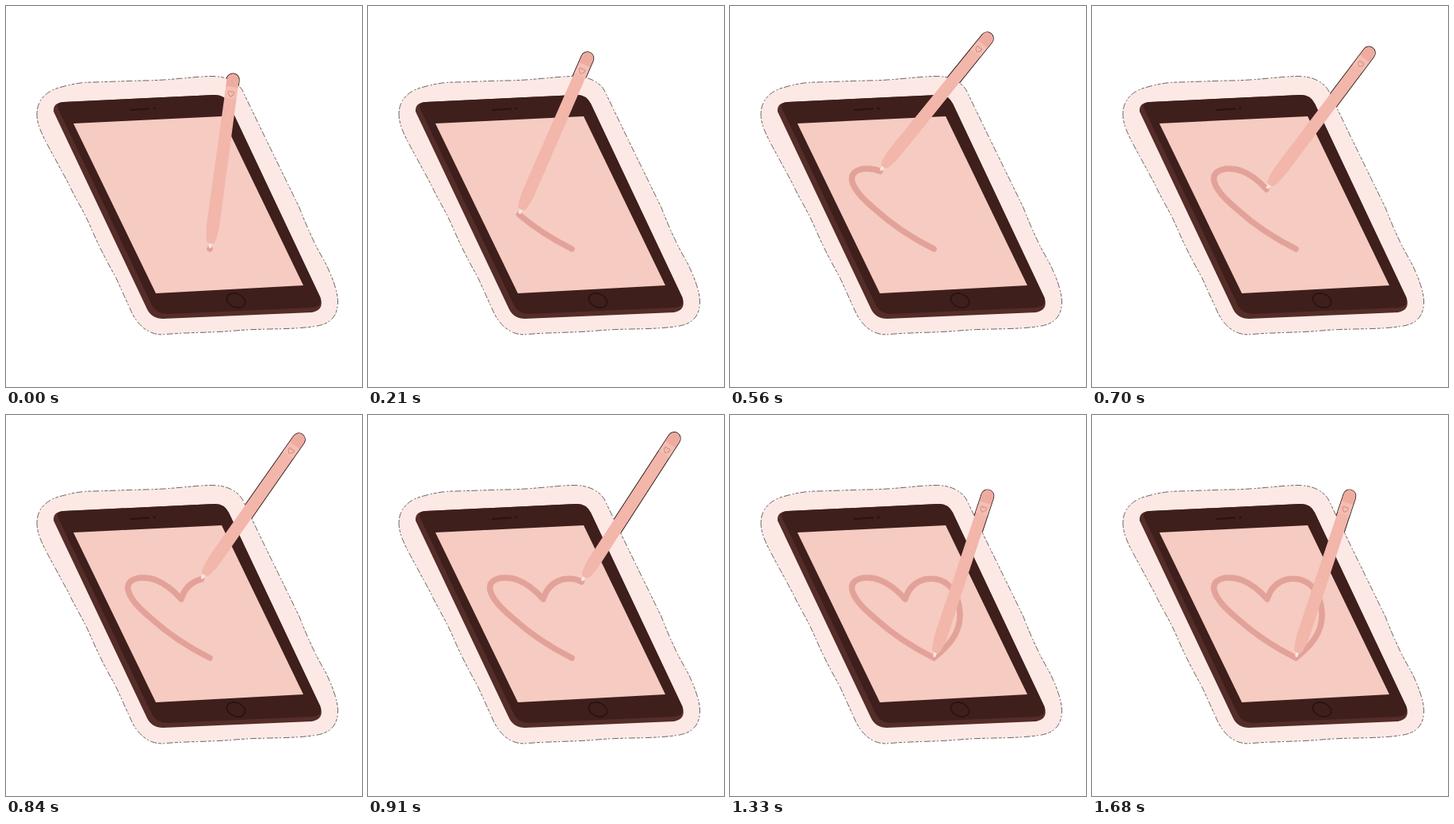
Write an HTML page that moves like this. It is 449x480 px and loops after 1.75 s.

```html
<!DOCTYPE html>
<html lang="en">
<head>
<meta charset="utf-8">
<title>Drawing a heart</title>
<style>
html, body { margin: 0; width: 100%; height: 100%; overflow: hidden; background: #fff; }
svg { display: block; width: 100vw; height: 100vh; }
</style>
</head>
<body>
<svg viewBox="0 0 449 480">
  <defs>
    <path id="body" d="M-4.5,-8 C-7,-14 -8,-24 -8,-34 L-7.6,-215 A7.6,7.6 0 0 1 7.6,-215 L8,-34 C8,-24 7,-14 4.5,-8 Q0,-5 -4.5,-8 Z"/>
  </defs>

  <!-- only shows where the pen leaves the sticker -->
  <g class="pen"><use href="#body" fill="none" stroke="#2b1a18" stroke-width="1.9"/></g>

  <path fill="#fce9e5" stroke="#4a4240" stroke-width=".8" stroke-dasharray="4 2 8 3 2 2" d="M39,136
    C39,120 49,107 70,102 C85,98 95,96 110,96 L170,94 C205,94 235,89 258,88.500
    C277,88 291,95 298,106 L326,164 L370,254 C380,280 391,304 402,322
    C411,340 419,360 418.500,374 C418,392 408,401 390,403.500 C360,408 330,406 295,408.500
    C260,412 225,411 197,414 C180,414 167,403 159,387 L139,343
    C127,321 118,305 107,279 C97,256 87,242 79,224 L54,178 C46,163 39,150 39,136 Z"/>

  <path fill="#542c28" d="M60,133 Q59,122 72,121 L262,112 Q275,111 281,123 L397,369 Q401,383 386,386 L198,394 Q184,394 178,382 Z"/>
  <path fill="#3e1f1c" d="M66,130 Q62,121.500 73,121 L262,112 Q275,111 281,123 L396.500,367 Q400,379 386,380 L203,388 Q190,388 184,377 Z"/>
  <path fill="#f6cbc1" d="M85,148 L272,139 L375,352 L189,362 Z"/>
  <g fill="none" stroke="#2a1211" stroke-linecap="round">
    <path stroke-width="2" d="M157,131 L180,129.500"/>
    <path stroke-width="3" d="M187,129 h.1"/>
    <ellipse cx="290" cy="371" rx="12" ry="8.500" stroke-width="1.6" transform="rotate(22 290 371)"/>
  </g>

  <path id="trail" fill="none" stroke="#e3a299" stroke-width="7.500" stroke-linecap="round" stroke-linejoin="round"/>

  <g class="pen">
    <path d="M-2.200,-9 L-1.600,-2 Q0,0 1.600,-2 L2.200,-9 Z" fill="#fce6e1"/>
    <use href="#body" fill="#f2b6aa"/>
    <path d="M-7.600,-206 L-7.600,-215 A7.600,7.600 0 0 1 7.600,-215 L7.600,-206 Z" fill="#eeaca0"/>
    <path d="M-7.600,-206 H7.600 V-191 H-7.600 Z" fill="#f4beb3"/>
    <path d="M0,-193.500 C-6,-198 -3.500,-202.500 0,-199.500 C3.500,-202.500 6,-198 0,-193.500 Z" fill="none" stroke="#d9948b" stroke-width="1.2"/>
  </g>
</svg>
<script>
const LOOP = 1750, STEP = 70;

// each stretch of the heart: end time, path commands
const parts = [
  [350, "C231,293 206,277 184,257 C171,246 160,236 155,224"],
  [560, "C150,211 160,205 173,205 Q182,205 189,208"],
  [840, "Q205,214 221,232 Q227,212 246,207"],
  [1050, "C268,203 288,216 290,250"],
  [1260, "C291,274 276,291 257,306"]
];
// time, tilt of the pen in degrees
const tilts = [[0, 7.8], [350, 34.2], [560, 39], [840, 35], [910, 33], [980, 27], [1050, 18.5], [1260, 18.4]];

const trail = document.getElementById("trail");
const pens = document.querySelectorAll(".pen");

let d = "M257,306";
const travel = [[0, 0]];
for (const [time, cmd] of parts) {
  d += " " + cmd;
  trail.setAttribute("d", d);
  travel.push([time, trail.getTotalLength()]);
}
const total = trail.getTotalLength();

function lerpKeys(keys, t) {
  const i = keys.findIndex(k => k[0] > t);
  if (i < 0) return keys[keys.length - 1][1];
  const [t0, a] = keys[i - 1], [t1, b] = keys[i];
  return a + (b - a) * (t - t0) / (t1 - t0);
}

function draw(now) {
  const t = Math.floor((now % LOOP) / STEP) * STEP;
  const len = lerpKeys(travel, t);
  const tip = trail.getPointAtLength(len);
  trail.setAttribute("stroke-dasharray", `${Math.max(len, 0.01)} ${total + 20}`);
  const pose = `translate(${tip.x} ${tip.y}) rotate(${lerpKeys(tilts, t)})`;
  pens.forEach(p => p.setAttribute("transform", pose));
}

let start;
function tick(now) {
  start ??= now;
  draw(now - start);
  requestAnimationFrame(tick);
}
draw(0);
requestAnimationFrame(tick);
</script>
</body>
</html>
```
